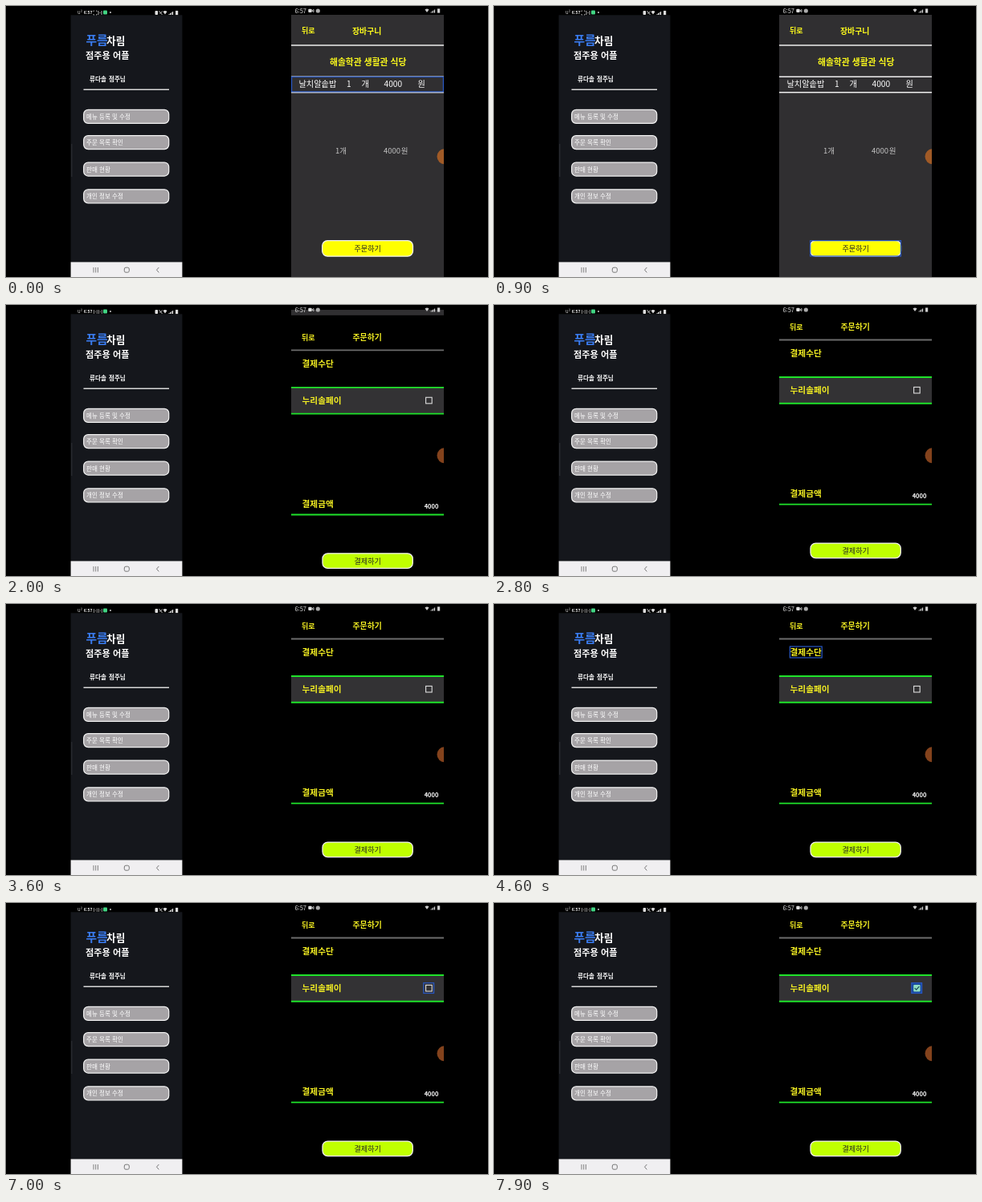
Recreate the animation shown at these times as an HTML page. Size 600 by 338 pixels, loop 8000 ms.

```html
<!DOCTYPE html>
<html lang="ko">
<head>
<meta charset="utf-8">
<style>
  html, body { margin: 0; width: 100%; height: 100%; overflow: hidden; background: #000; }
  svg { display: block; width: 600px; height: 338px; font-family: "Noto Sans CJK KR", "Noto Sans CJK", sans-serif; }
  text { white-space: pre; }
  .focus { fill: none; stroke: #2858c4; stroke-width: 1.2; }
</style>
</head>
<body>
<svg viewBox="0 0 600 338">
  <defs><clipPath id="phone"><rect x="355" y="0" width="190" height="338"/></clipPath></defs>
  <rect width="600" height="338"/>
  <g id="owner"></g>
  <g clip-path="url(#phone)">
    <g id="cart"></g>
    <g id="pay"></g>
    <g id="bar"></g>
  </g>
</svg>
<script>
const LOOP = 8000, YELLOW = '#fdfb1c', GREEN = '#1fe32a', GREY = '#302f31';
const $ = id => document.getElementById(id);

function add(parent, tag, attrs, content) {
  const el = document.createElementNS('http://www.w3.org/2000/svg', tag);
  for (const k in attrs) el.setAttribute(k, attrs[k]);
  if (content) el.textContent = content;
  parent.append(el);
  return el;
}
// Text is placed by its left edge and vertical centre.
const label = (g, s, x, cy, size, fill, weight = 400) =>
  add(g, 'text', { x, y: cy + size * .37, 'font-size': size, fill, 'font-weight': weight }, s);
const box = (g, x, y, width, height, fill, more) =>
  add(g, 'rect', { x, y, width, height, fill, ...more });
const line = (g, d, stroke, width = 1) =>
  add(g, 'path', { d, stroke, 'stroke-width': width, fill: 'none' });
const button = (g, x, y, w, h, fill, r) =>
  box(g, x, y, w, h, fill, { rx: r, stroke: '#f2f2f2', 'stroke-width': 1.25 });
const focus = (g, x, y, width, height) =>
  add(g, 'rect', { x, y, width, height, class: 'focus' });

function signal(g, x, y, fill) {
  add(g, 'path', { d: `M${x} ${y - 1.5}q2.5 -2 5 0l-2.5 3.6z`, fill });
  for (let i = 0; i < 4; i++) box(g, x + 7 + i * 1.5, y + 1.5 - i, 1.1, 1 + i, fill);
  box(g, x + 15.5, y - 2.6, 3.2, 5.2, fill);
}

// Shop owner's phone
const owner = $('owner');
box(owner, 80.6, 11.3, 138.8, 308.7, '#15171c');
box(owner, 80.6, 319.4, 138.8, 18.6, '#f0eff1');
box(owner, 81.2, 172, 1.2, 41, '#2c2e32');
label(owner, 'u²', 89, 8, 6, '#ccc', 500);
label(owner, '6:57', 96.8, 8, 5.2, '#eee', 700);
const corners = add(owner, 'g', {}), brackets = add(owner, 'g', {});
line(corners, 'M109 7v-1h1m2 0h1v1m0 3v1h-1m-2 0h-1v-1', '#bbb', .9);
line(corners, 'M115 6v5m1.5 -2.5h1m1.5 -2.5v5', '#ccc', .9);
line(brackets, 'M109.5 6v5m1.4 -2.5h1m1.5 -2.5v5M115.5 6v5m1.4 -2.5h1m1.5 -2.5v5', '#aaa', .8);
box(owner, 121, 5.5, 5, 5, '#42d483', { rx: 1 });
add(owner, 'circle', { cx: 130, cy: 8, r: .9, fill: '#ddd' });
box(owner, 185.5, 6, 3.6, 5, '#ddd', { rx: 1 });
line(owner, 'M190.5 6l4 5m-3.5 -2h1.5l2 -2.5', '#ccc', .9);
signal(owner, 195.5, 8.5, '#ddd');

label(owner, '푸름', 99.5, 42.5, 14.8, '#3a7cf0', 700);
label(owner, '차림', 125, 43.5, 12.7, '#fff', 700);
label(owner, '점주용 어플', 99, 62, 11.2, '#fff', 700);
label(owner, '류다솔', 104, 91.5, 7.6, '#fff', 700);
label(owner, '점주님', 128, 91.5, 7.5, '#fff', 700);
line(owner, 'M96.5 104.2H203', '#d8d8d8', 1.4);
[['메뉴 등록 및 수정', 129.4], ['주문 목록 확인', 161.6], ['판매 현황', 195], ['개인 정보 수정', 228.8]]
  .forEach(([s, y]) => {
    button(owner, 96.7, y, 106, 17, '#a6a3a6', 5.5);
    label(owner, s, 100, y + 8.8, 7.55, '#fff', 500);
  });
line(owner, 'M109 326v6.5m2.7 -6.5v6.5m2.7 -6.5v6.5', '#777', .9);
box(owner, 147.3, 326.2, 6, 6, 'none', { rx: 1.8, stroke: '#777' });
line(owner, 'M190.3 326l-2.8 3.2l2.8 3.2', '#777', 1);

// Cart screen
const cart = $('cart');
box(cart, 355, 11, 190, 327, GREY);
label(cart, '뒤로', 368, 31, 9, YELLOW, 700);
label(cart, '장바구니', 431, 31, 9.9, YELLOW, 700);
line(cart, 'M355 49H545', '#eee', 1.5);
label(cart, '해솔학관 생활관 식당', 403, 70, 10.8, YELLOW, 700);
line(cart, 'M355 88.3H545M355 107.8H545', '#eee', 1.5);
[['날치알솥밥', 364.5], ['1', 424], ['개', 442.5], ['4000', 470.5], ['원', 512.5]]
  .forEach(([s, x]) => label(cart, s, x, 97, 10.2, '#fff', 500));
[['1개', 410], ['4000', 470], ['원', 491.8]]
  .forEach(([s, x]) => label(cart, s, x, 180.5, 9.5, '#c4c4c4'));
button(cart, 393.7, 292.6, 112.8, 19.6, '#ffff00', 6.5);
label(cart, '주문하기', 433.5, 302.5, 9.1, '#222');
const rowFocus = focus(cart, 355.6, 88.5, 188.8, 18.4);
const orderFocus = focus(cart, 393.7, 292.6, 112.8, 19.4);

// Payment screen
const pay = $('pay');
box(pay, 355, 0, 190, 358, '#000');
label(pay, '뒤로', 368, 27.7, 9, '#f3ee22', 700);
label(pay, '주문하기', 431.5, 27.7, 9.9, '#f3ee22', 700);
line(pay, 'M355 43.5H545', '#6c6c6c', 1.8);
label(pay, '결제수단', 368.5, 60, 10.7, '#f3ee22', 700);
box(pay, 355, 90, 190, 33, '#333234');
line(pay, 'M355 90H545M355 122.8H545M355 248.6H545', GREEN, 1.9);
label(pay, '누리솔페이', 368.5, 106.3, 10.7, '#f3ee22', 700);
label(pay, '결제금액', 368.5, 234.8, 10.7, '#f3ee22', 700);
label(pay, '4000', 520.7, 238, 7.5, '#fff', 700);
button(pay, 394, 297, 112.3, 18.6, '#c0ff00', 6.5);
label(pay, '결제하기', 433.5, 306.5, 9.1, '#222');
const tick = box(pay, 522.6, 102.4, 7.6, 7.6, 'none', { stroke: '#ddd', 'stroke-width': 1.1 });
const mark = add(pay, 'g', {});
box(mark, 520, 100, 12.2, 12.2, '#17479a');
box(mark, 522.2, 102, 8.4, 8.4, '#8fdcc4', { rx: 1 });
line(mark, 'M523.7 106.2l2 2l3.6 -4', '#174b55', 1.2);
const methodFocus = focus(pay, 368.4, 53, 39.8, 14);
const nameFocus = focus(pay, 368.4, 99, 49.6, 14.4);
const tickFocus = focus(pay, 519.8, 99.7, 12.8, 12.8);

// Status bar and floating button; the old screen shows through above the sliding one
const bar = $('bar');
box(bar, 355, 0, 190, 11, '#000');
const gap = box(bar, 355, 6, 190, 0, GREY);
label(bar, '6:57', 359.4, 6, 7.5, '#ddd', 500);
box(bar, 376.3, 3.7, 4.4, 4.4, '#ddd', { rx: 1 });
line(bar, 'M381 6l2 -1.6v3.2z', '#ddd', .8);
add(bar, 'circle', { cx: 388.3, cy: 6, r: 2.6, fill: '#aaa' });
signal(bar, 521.5, 6, '#ccc');
const ball = add(bar, 'circle', { cx: 546, cy: 187.8, r: 9.5 });

const show = (el, on) => el.setAttribute('visibility', on ? 'inherit' : 'hidden');

function draw(t) {
  const within = (a, b) => t >= a && t < b;
  const paying = t >= 1990;
  const slide = paying ? 13 * Math.max(0, 1 - Math.max(0, t - 2000) / 250) ** 3 : 0;

  show(cart, !paying);
  show(pay, paying);
  pay.setAttribute('transform', `translate(0 ${slide})`);
  gap.setAttribute('height', Math.max(0, slide - 6));
  ball.setAttribute('fill', paying ? '#83421c' : '#a05a26');

  const framed = !paying || within(4900, 6300);
  show(corners, framed);
  show(brackets, !framed);

  show(rowFocus, t < 600);
  show(orderFocus, !paying && t >= 600);
  show(methodFocus, within(4590, 5750));
  show(nameFocus, within(5750, 6650));
  show(tickFocus, t >= 6650);
  show(tick, paying && t < 7400);
  show(mark, t >= 7400);
}

const start = performance.now();
function loop(now) {
  draw(Math.max(0, now - start) % LOOP);
  requestAnimationFrame(loop);
}
draw(0);
requestAnimationFrame(loop);
</script>
</body>
</html>
```
